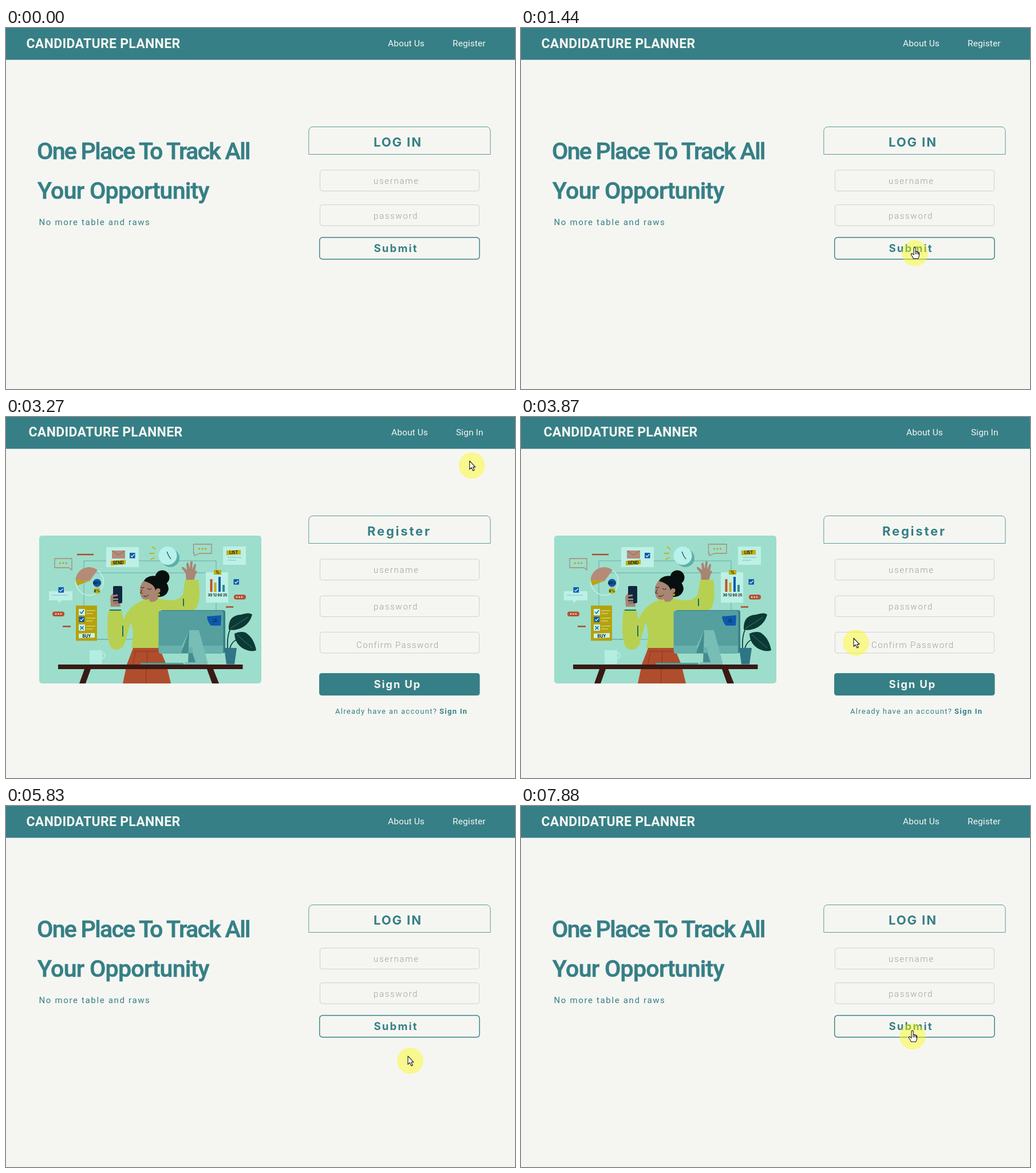
An HTML page that plays this animation: 889x630 px, repeating every 8000 ms.

```html
<!DOCTYPE html>
<html lang="en">
<head>
<meta charset="utf-8">
<title>Candidature Planner</title>
<style>
html, body { margin: 0; width: 100%; height: 100%; overflow: hidden; background: #f5f6f2; }
svg { display: block; width: 889px; height: 630px; font-family: Roboto, sans-serif; fill: none; }
text { fill: #367f86; white-space: pre; }
.brand { font: 700 23px Roboto, sans-serif; letter-spacing: .3px; fill: #f5f6f2; }
.nav { font-size: 15.5px; letter-spacing: .1px; fill: #f5f6f2; }
.hero { font-size: 41px; font-weight: 500; stroke: #367f86; stroke-width: .7px; }
.tag { font-size: 15px; letter-spacing: 1.65px; }
.title { font: 700 22px Inter, sans-serif; }
.button { font: 700 18.5px Inter, sans-serif; }
.hint { font-size: 15px; font-weight: 300; letter-spacing: 1.7px; fill: #9b9e9b; }
.note { font-size: 13px; letter-spacing: 1.28px; }
.mini { font: 700 7px Inter, sans-serif; fill: #151b1b; text-anchor: middle; }
</style>
</head>
<body>
<svg viewBox="0 0 889 630">
  <defs>
    <rect id="field" x="548.5" width="278" height="36.5" rx="4" stroke="#cdd1ce"/>
    <g id="check"><rect width="9.5" height="9.5" fill="#0d58ad"/><path d="M2 5l2 2 4-4.500" stroke="#d8f6f0" stroke-width="1.300"/></g>
    <g id="dots"><circle cx="-5.500" r="1.700"/><circle r="1.700"/><circle cx="5.500" r="1.700"/></g>
  </defs>
  <path d="M0 0H889V55.500H0Z" fill="#367f86"/>
  <path d="M528.800 220.500V179.500a7 7 0 0 1 7-7H839a7 7 0 0 1 7 7V220.500Z" stroke="#5c9a9b"/>
  <use href="#field" y="248"/>
  <text class="hint" x="642" y="272">username</text>

  <g id="login">
    <text class="brand" x="35.500" y="35">CANDIDATURE PLANNER</text>
    <text class="nav" x="667" y="32">About Us</text>
    <text class="nav" x="780" y="32">Register</text>
    <text class="hero" x="54" y="229" letter-spacing="-1.68">One Place To Track All</text>
    <text class="hero" x="55" y="298" letter-spacing="-.7">Your Opportunity</text>
    <text class="tag" x="57.500" y="344">No more table and raws</text>
    <text class="title" x="642" y="207" letter-spacing="1.9">LOG IN</text>
    <use href="#field" y="308.500"/>
    <text class="hint" x="642" y="333">password</text>
    <rect x="547.700" y="365.500" width="279.300" height="38" rx="5" stroke="#367f86" stroke-width="1.400"/>
    <text class="button" x="642.500" y="391" letter-spacing="2.2">Submit</text>
  </g>

  <g id="register">
    <text class="brand" x="39.500" y="34">CANDIDATURE PLANNER</text>
    <text class="nav" x="673" y="32">About Us</text>
    <text class="nav" x="786" y="32">Sign In</text>
    <text class="title" x="631" y="207" letter-spacing="2.8">Register</text>
    <use href="#field" y="312"/>
    <text class="hint" x="642" y="336">password</text>
    <use href="#field" y="375.500"/>
    <text class="hint" x="612" y="403" style="letter-spacing:1.4px">Confirm Password</text>
    <rect x="547" y="447" width="280.500" height="39" rx="4.500" fill="#367f86"/>
    <text class="button" x="642.500" y="473" letter-spacing="1.8" style="fill:#f5f6f2">Sign Up</text>
    <text class="note" x="575" y="518">Already have an account?</text>
    <text class="note" x="757" y="518" font-weight="600">Sign In</text>

    <rect x="58" y="207" width="388" height="258" rx="5" fill="#9cdecb"/>
    <path d="M136 388V251H367V388ZM150 272H367" stroke="#68a9ae"/>
    <path d="M124 240H153M384 331.500H397M99 365.500H113" stroke="#b0492f" stroke-width="2.600"/>
    <path d="M85 247H115V267L110 263H85ZM327.500 222H359V238H338L329 242V238H327.500Z" stroke="#ac8775" stroke-width="1.300"/>
    <g fill="#c3a51b"><use href="#dots" x="100" y="255"/><use href="#dots" x="343" y="230"/></g>
    <!-- cards -->
    <g fill="#bdf0e6">
      <path d="M175 227H232V262H175ZM379 226H419V258H379ZM349 271H388V324H349ZM75 304H116V320H97L91 325V320H75Z"/>
    </g>
    <path d="M185 233H208V247H185Z" fill="#b48b76"/>
    <path d="M185 233l11.500 8 11.500-8" stroke="#8f6757"/>
    <use href="#check" x="216" y="237"/><use href="#check" x="91.500" y="297"/><use href="#check" x="397.500" y="283"/>
    <path d="M183 251l26-2v8l-26 2ZM385 233l25-1v8l-25 1ZM363 267H376V275H363Z" fill="#c3ae13"/>
    <text class="mini" x="196" y="256.500">SEND</text>
    <text class="mini" x="397.500" y="239">LIST</text>
    <text class="mini" x="369.500" y="273.500">%</text>
    <path d="M387 245H411M387 250H402M80 311H108" stroke="#7cc1b9"/>
    <path d="M255 226l6 5M250 238h9M252 249l8-4" stroke="#c9ae20" stroke-width="1.800"/>
    <circle cx="287" cy="246" r="16" fill="#5fafa9"/>
    <circle cx="282.500" cy="242" r="16" fill="#b8f1eb"/>
    <path d="M281 235l3 7 4 6" stroke="#1c474c" stroke-width="1.300"/>
    <path d="M358.500 305V283" stroke="#c24e2c" stroke-width="4"/>
    <path d="M365.500 305V289" stroke="#c3ae13" stroke-width="4"/>
    <path d="M373 305V279" stroke="#0d58ad" stroke-width="4"/>
    <path d="M380 305V293" stroke="#328a90" stroke-width="4"/>
    <text class="mini" x="369.500" y="312.500" style="font-size:6px">30 12 60 25</text>
    <!-- pie chart -->
    <circle cx="146" cy="287" r="24" stroke="#c5f3e8" stroke-width="1.500"/>
    <path d="M146 286L121.500 284A24 24 0 0 1 160 267Z" fill="#b48b76"/>
    <path d="M146 286L121.500 284A24 24 0 0 0 125 294Z" fill="#bca318"/>
    <circle cx="159" cy="289.500" r="7" fill="#0d58ad"/><circle cx="159" cy="303" r="6" fill="#bac33f"/>
    <text class="mini" x="159" y="292" style="font-size:6px">60%</text>
    <text class="mini" x="159" y="305.500" style="font-size:6.5px">8%</text>
    <g fill="#b94f34"><rect x="81" y="339.500" width="21" height="8.500" rx="4"/><rect x="398" y="310" width="21" height="8.500" rx="4"/></g>
    <g fill="#d9e8d8" transform="scale(.8)"><use href="#dots" x="114.400" y="429.700"/><use href="#dots" x="509.400" y="392.800"/></g>
    <!-- shopping list -->
    <path d="M122 329H159V390.500H122Z" fill="#b4a20d"/>
    <path d="M127 335h11v11h-11ZM127 362h11v11h-11ZM127 378l28-1v8l-28 1Z" fill="#c9f3e9"/>
    <path d="M129 340l3 3 4-6M129.500 365l6 6M135.500 365l-6 6" stroke="#0d58ad" stroke-width="1.400"/>
    <use href="#check" x="127.500" y="348.500"/>
    <path d="M140 338H156M140 343H152M140 351H156M140 356H152M140 365H156M140 370H152" stroke="#e0e9a5"/>
    <text class="mini" x="141" y="384.500">BUY</text>
    <path d="M159 388H180" stroke="#68a9ae"/>
    <!-- mug -->
    <path d="M146 407H168V427a4 4 0 0 1-4 4H150a4 4 0 0 1-4-4Z" fill="#b4eee2"/>
    <path d="M168 412q7 0 4 7l-4 3" stroke="#b4eee2" stroke-width="2"/>
    <!-- woman -->
    <path d="M222 403H268L280 432L288 465H204L211 432Z" fill="#b04d2d"/>
    <path d="M224 409H268M247 410L244 465M226 410l-5 25" stroke="#873820"/>
    <path d="M315 290L314 273L307 264q-1-3 3-2L316 267L315 256q2-4 4 0L321 265L322 253q2-3 4 0L325 266L329 257q3-2 3 2L330 269L333 268q2 2-2 7L327 290Z" fill="#a98573"/>
    <path d="M236 322Q249 313 268 317C287 322 303 321 309 309L313 284H336Q341 317 333 332Q326 346 286 337L270 347V403H219Q225 378 218 358L207 396Q200 411 185 404Q173 390 179 337H202L205 353Q217 328 236 322Z" fill="#b7d052"/>
    <path d="M181 337H201M310 317v13M204 364v19" stroke="#147267" stroke-width="2"/>
    <path d="M183 331L182 315Q183 309 191 306L199 314L200 331Z" fill="#a98573"/>
    <rect x="187" y="295" width="16" height="30" rx="2" fill="#10263f"/>
    <path d="M183 313l12-2M183 318h13M184 323h12" stroke="#a98573" stroke-width="3"/>
    <circle cx="273" cy="280" r="12.500" fill="#07100f"/>
    <path d="M239 289Q246 274 265 278Q282 284 284 300Q281 315 264 314Z" fill="#07100f"/>
    <path d="M240 286Q231 297 235 311Q237 321 250 318L251 322Q261 325 266 316L265 308Q271 306 269 300Q263 297 261 303Q260 291 240 286Z" fill="#a98573"/>
    <path d="M235 296q3 4 6 1M247 299q4 4 7 0M238 301l-3 6 4 1M240 312q5 3 9-2" stroke="#432c28" stroke-width="1.100"/>
    <circle cx="267" cy="310" r="2" fill="#c3ae13"/>
    <!-- desk -->
    <path d="M137 440H148L139 465H128ZM351 440H362L372 465H360Z" fill="#3a1915"/>
    <path d="M91 432H413.500V440H91Z" fill="#3a1915"/>
    <path d="M235 430.500H310" stroke="#4f9f9e" stroke-width="3"/>
    <rect x="270" y="337" width="113" height="75" rx="4" fill="#367f86"/>
    <rect x="266.500" y="338" width="113" height="74.500" rx="4" fill="#559f9f"/>
    <path d="M267 399H379V409a4 4 0 0 1-4 4H271a4 4 0 0 1-4-4Z" fill="#68b1ac"/>
    <path d="M320 372H337L352 428V432H312V428H330L325 402H306Z" fill="#79bdb7"/>
    <path d="M320 372L306 412H326L331 428H318" fill="#438c8f"/>
    <path d="M351 348L376 346L375 364H358Q352 358 351 348Z" fill="#0d58ad"/>
    <path d="M361 357h6v-4h-5" stroke="#0b2345"/>
    <!-- plant -->
    <path d="M387 404Q385 369 402 359M391 404Q395 387 414 386" stroke="#0b3935" stroke-width="1.700"/>
    <path d="M389 366Q390 346 410 345Q426 340 430 345Q426 359 415 366Q401 374 389 371ZM399 378Q409 373 418 376Q433 385 437 407Q429 411 416 405Q400 397 399 378Z" fill="#0b3935"/>
    <path d="M392 369L423 349M403 380L430 403" stroke="#4c8c7c" stroke-width=".8"/>
    <path d="M381 403H403L399 431.500H385Z" fill="#2f7586"/>
  </g>

  <circle id="ring" r="8.500" stroke="#c4412c" stroke-width="2" opacity=".85"/>
  <g id="cursor">
    <circle r="23" fill="#fafa14" fill-opacity=".45"/>
    <g fill="#fff" stroke="#17171c" stroke-width="1.100" stroke-linejoin="round">
      <path id="arrow" d="M-4-8V6.500L-.7 3.500 2 9 4.300 8 1.900 2.600H6Z"/>
      <path id="hand" d="M-2 3V-8.500a1.600 1.600 0 0 1 3.200 0V-2.500q1.500-1.500 2.600 .5 1.500-1 2.400 .6 1.300-.5 1.300 1.200V4Q7 7 5.500 9.500H-2.500Q-4 6-6.500 3-7.500 1-5.500 .6-4 .6-2 3ZM1.200-2.500V2M3.800-2V2M6.200-1.400V2.500"/>
    </g>
  </g>
</svg>
<script>
const LOOP = 8000, STEP = 120;
// Movement is sampled in steps counted from the start of each burst.
const bursts = [0, 2310, 4480, 5230, 6680];
const path = [ // time, x, y
  [120, 859, 391], [480, 720, 310], [840, 654, 347], [1200, 704, 388], [1440, 688, 393],
  [2190, 688, 393], [2910, 805, 35], [3030, 812, 42], [3150, 832, 60], [3870, 585, 394],
  [4230, 693, 474], [4480, 697, 474], [5350, 697, 474], [5950, 707, 441], [6430, 707, 422],
  [6560, 707, 422], [6800, 687, 390], [7400, 431, 415], [7880, 684, 402]
];
const clicks = [[2910, 805, 25], [5230, 696, 464]];
const targets = { // left, top, right, bottom
  login: [[547, 365, 827, 404], [780, 17, 838, 32]],
  register: [[547, 447, 827, 486]]
};
const el = id => document.getElementById(id);
const show = (id, on) => el(id).style.display = on ? '' : 'none';
const place = (id, x, y) => el(id).setAttribute('transform', `translate(${x} ${y})`);

function position(t) {
  const i = path.findIndex(k => k[0] > t);
  if (i < 0) return path.at(-1).slice(1);
  if (i === 0) return path[0].slice(1);
  const [a, b] = [path[i - 1], path[i]];
  const p = (t - a[0]) / (b[0] - a[0]), e = p * p * (3 - 2 * p);
  return [a[1] + (b[1] - a[1]) * e, a[2] + (b[2] - a[2]) * e];
}

function draw() {
  const now = performance.now() % LOOP;
  const start = bursts.findLast(b => b <= now);
  const t = start + Math.floor((now - start) / STEP) * STEP;
  const page = t >= 3270 && t < 5470 ? 'register' : 'login';
  const [x, y] = position(t);
  const over = targets[page].some(([l, top, r, b]) => x - 2 > l && x - 2 < r && y - 9 > top && y - 9 < b);
  const click = clicks.find(c => t >= c[0] && t < c[0] + 2 * STEP);

  show('login', page === 'login');
  show('register', page === 'register');
  show('cursor', t >= STEP);
  show('hand', over);
  show('arrow', !over);
  show('ring', click);
  place('cursor', x, y);
  if (click) place('ring', click[1], click[2]);
  requestAnimationFrame(draw);
}
draw();
</script>
</body>
</html>
```
